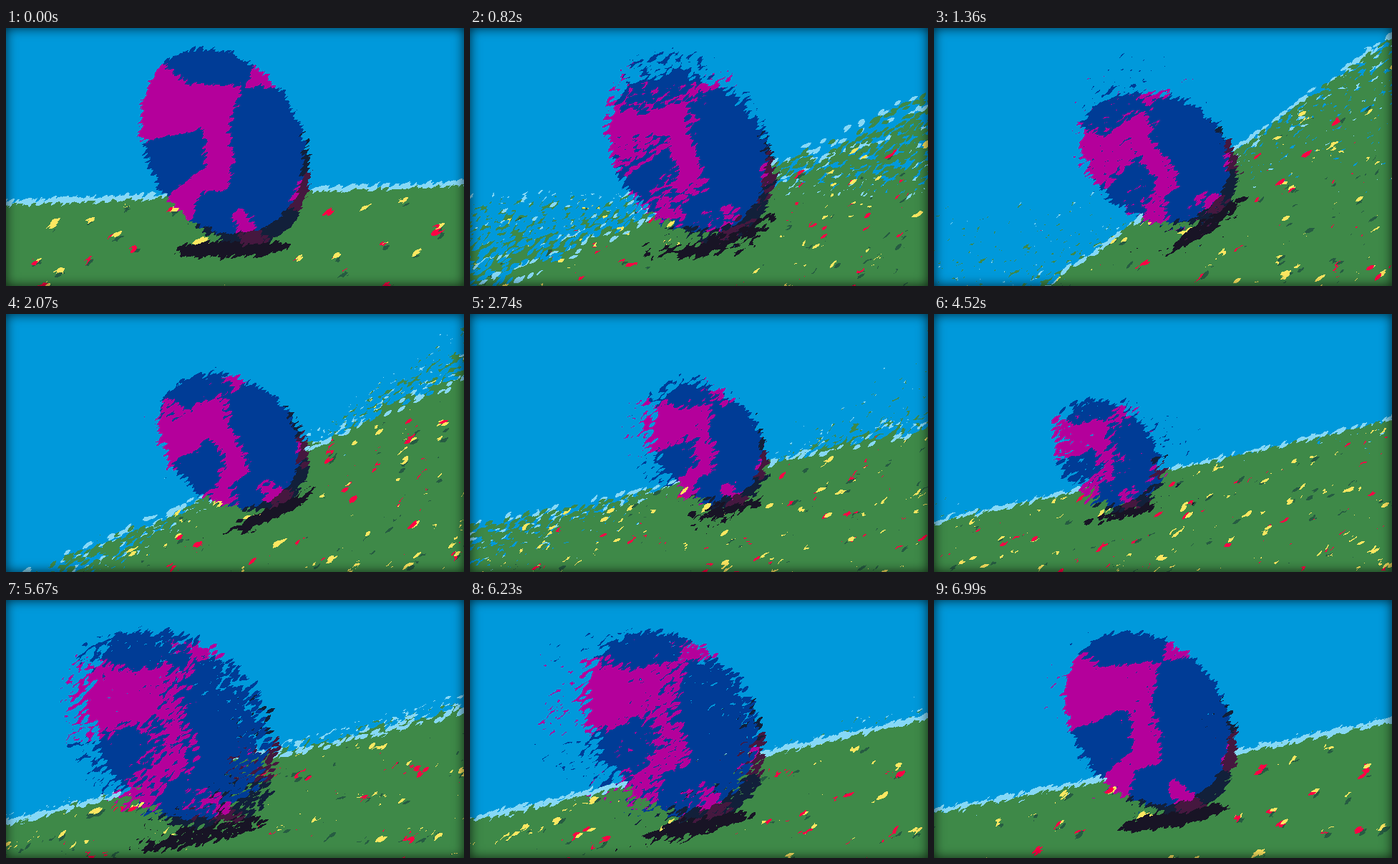
An HTML page with a canvas that plays this animation: 640x360 px, repeating every 7.05 s.

```html
<!DOCTYPE html>
<html>
<head>
<meta charset="utf-8">
<style>
html, body { margin: 0; width: 640px; height: 360px; overflow: hidden; background: #0099db; }
canvas { display: block; }
body::after { content: ""; position: absolute; inset: 0; box-shadow: inset 0 0 16px rgba(0, 0, 0, .75); }
</style>
</head>
<body>
<canvas id="stage" width="640" height="360"></canvas>
<script>
const W = 640, H = 360, LOOP = 7050, STEP = LOOP / 105;
const RATE = 34;       // strokes painted per ms
const MEMORY = 2000;   // ms of strokes that can still show

const color = {
  sky: '#0099db', rim: '#86d8f6', grass: '#3e8948', leaf: '#265c42', shadow: '#181425',
  blue: '#003c96', pink: '#b4009b', darkBlue: '#12203a', darkPink: '#45183f',
  yellow: '#fee761', red: '#ff0044'
};
const pixelOf = hex => (0xff000000 | parseInt(hex.slice(1).match(/../g).reverse().join(''), 16)) >>> 0;

// Integer hash: the same n always gives the same 32 bits.
function hash(n) {
  n = Math.imul(n ^ (n >>> 16), 0x45d9f3b);
  n = Math.imul(n ^ (n >>> 15), 0x2c1b3c6d);
  return (n ^ (n >>> 16)) >>> 0;
}
let seed = 7919;
const rand = (min, max) => min + (max - min) * hash(seed++) / 4294967296;

// ---- The still world: a hill with flowers and an egg ----
const X0 = -500, Y0 = -500, WW = 1700, WH = 1300;
const EGG = { x: 306, y: 165, r: 108, long: 1.343, tilt: -Math.PI / 6 };
const horizon = x => 247 - 0.042 * x;

// Corners of the egg's spots, in units of its short radius.
const spots = [
  [[-.16, -1.4], [-.05, -.96], [.59, -.57], [.16, -.17], [0, .21], [-.26, .49], [-.56, .35],
   [-.87, .62], [-1.2, .2], [-.36, .11], [-.13, -.34], [-1.1, -.65], [-1.1, -1.4]],
  [[.78, -.7], [1.1, -.75], [1.1, -.25], [.64, -.52]],
  [[-.23, .75], [-.12, 1.4], [-.55, 1.4], [-.34, .82]],
  [[1, .7], [.6, .86], [.3, 1.1], [.6, 1.4]]
];

function buildWorld() {
  const cv = document.createElement('canvas');
  cv.width = WW; cv.height = WH;
  const g = cv.getContext('2d', { willReadFrequently: true });
  g.translate(-X0, -Y0);

  const shape = (points, fill) => {
    g.fillStyle = fill;
    g.beginPath();
    for (const [x, y] of points) g.lineTo(x, y);
    g.fill();
  };
  const oval = (x, y, rx, ry, turn, fill) => {
    g.fillStyle = fill;
    g.beginPath(); g.ellipse(x, y, rx, ry, turn, 0, 7); g.fill();
  };
  const hill = (lift, fill) => {
    const right = X0 + WW, bottom = Y0 + WH;
    shape([[X0, horizon(X0) - lift], [right, horizon(right) - lift], [right, bottom], [X0, bottom]], fill);
  };
  const flower = (x, y) => {
    const size = rand(5, 8.5), turn = rand(-.7, -.2), kind = rand(0, 1);
    oval(x + 3, y + 4, size * .7, 2.6, turn, color.leaf);
    oval(x, y, size, 3.6, turn, kind < .2 ? color.red : color.yellow);
    if (kind > .7) oval(x - 2, y + 1, size * .6, 3, turn, color.red);
  };
  const eggPaint = (dx, dy, size, body, spot) => {
    g.beginPath(); g.ellipse(dx, dy, size, size * EGG.long, 0, 0, 7); g.clip();
    g.fillStyle = body;
    g.fillRect(-2, -2, 4, 4);
    for (const s of spots) shape(s, spot);
  };

  g.fillStyle = color.sky; g.fillRect(X0, Y0, WW, WH);
  hill(7, color.rim);
  hill(0, color.grass);
  for (let gy = 180; gy < Y0 + WH; gy += 52)
    for (let gx = X0; gx < X0 + WW; gx += 52) {
      const x = gx + rand(0, 46), y = gy + rand(0, 46);
      if (y > horizon(x) + 6) flower(x, y);
    }
  oval(315, 308, 81, 12, -.042, color.shadow);

  g.translate(EGG.x, EGG.y); g.rotate(EGG.tilt); g.scale(EGG.r, EGG.r);
  eggPaint(0, 0, 1, color.darkBlue, color.darkPink);
  eggPaint(-.02, -.29, 1.08, color.blue, color.pink);   // the lit part

  // Soft edge pixels take their left neighbour's pure colour.
  const out = new Uint32Array(g.getImageData(0, 0, WW, WH).data.buffer);
  const pure = new Set(Object.values(color).map(pixelOf));
  for (let i = 1; i < out.length; i++) if (!pure.has(out[i])) out[i] = out[i - 1];
  return out;
}

// ---- Camera: time, turn in degrees, zoom, egg x, egg y ----
const keys = [
  [0, 0, 1, 306, 165], [400, -1, 1, 306, 166], [820, 23, .87, 309, 177], [1300, 34, .79, 315, 181],
  [2070, 20, .77, 318, 178], [3150, 3, .53, 338, 187], [3800, 9, .57, 275, 190], [4520, 10.5, .61, 237, 196],
  [5200, 12.8, 1.05, 205, 179], [5670, 11, 1.05, 254, 179], [6300, 9.8, .98, 297, 171], [7050, 8.7, .963, 302, 170]
];
const slope = (i, c) => {
  const a = keys[i - 1], b = keys[i + 1];
  return a && b ? (b[c] - a[c]) / (b[0] - a[0]) : 0;
};
// Smooth spline through the keys.
function camera(t) {
  t = Math.max(0, t);
  const i = keys.findLastIndex(k => k[0] <= t);
  const a = keys[i], b = keys[i + 1], d = b[0] - a[0], u = (t - a[0]) / d, v = 1 - u;
  const at = c => a[c] * v * v * (1 + 2 * u) + b[c] * u * u * (3 - 2 * u)
    + d * u * v * (slope(i, c) * v - slope(i + 1, c) * u);
  const turn = at(1) * Math.PI / 180, zoom = at(2);
  return { cos: Math.cos(turn) / zoom, sin: Math.sin(turn) / zoom, x: at(3), y: at(4) };
}

// ---- Leaf-shaped brush marks as pixel offsets ----
const brushes = Array.from({ length: 32 }, () => {
  const turn = rand(-.9, -.3), len = rand(5.5, 8.5), wide = rand(1.7, 2.7);
  const c = Math.cos(turn), s = Math.sin(turn), marks = [];
  for (let y = -9; y <= 9; y++)
    for (let x = -9; x <= 9; x++) {
      const u = (x * c + y * s) / len, v = y * c - x * s;
      if (Math.abs(v) < wide * (1 - u * u)) marks.push(x, y);
    }
  return marks;
});

const world = buildWorld();
const ctx = document.getElementById('stage').getContext('2d');
const image = ctx.createImageData(W, H);
const pixels = new Uint32Array(image.data.buffer);
const clamp = (v, max) => v < 0 ? 0 : v > max ? max : v | 0;

// Strokes land in order; each keeps the colour seen when it was painted.
function paint(tick) {
  pixels.fill(pixelOf(color.sky));
  const count = Math.round(RATE * STEP);
  for (let k = tick - Math.ceil(MEMORY / STEP); k <= tick; k++) {
    const cam = camera(k * STEP);
    for (let i = 0; i < count; i++) {
      const h = hash(k * count + i), h2 = hash(h + 77);
      const x = h % (W + 16) - 8, y = h2 % (H + 16) - 8;
      const dx = x - cam.x, dy = y - cam.y;
      const wx = clamp(dx * cam.cos - dy * cam.sin + EGG.x - X0, WW - 1);
      const wy = clamp(dx * cam.sin + dy * cam.cos + EGG.y - Y0, WH - 1);
      const ink = world[wy * WW + wx], marks = brushes[h2 >>> 27];
      for (let m = 0; m < marks.length; m += 2) {
        const px = x + marks[m], py = y + marks[m + 1];
        if (px >= 0 && px < W && py >= 0 && py < H) pixels[py * W + px] = ink;
      }
    }
  }
  ctx.putImageData(image, 0, 0);
}

let shown = -1;
function frame() {
  const tick = Math.floor(performance.now() % LOOP / STEP);
  if (tick !== shown) paint(tick);
  shown = tick;
  requestAnimationFrame(frame);
}
frame();
</script>
</body>
</html>
```
